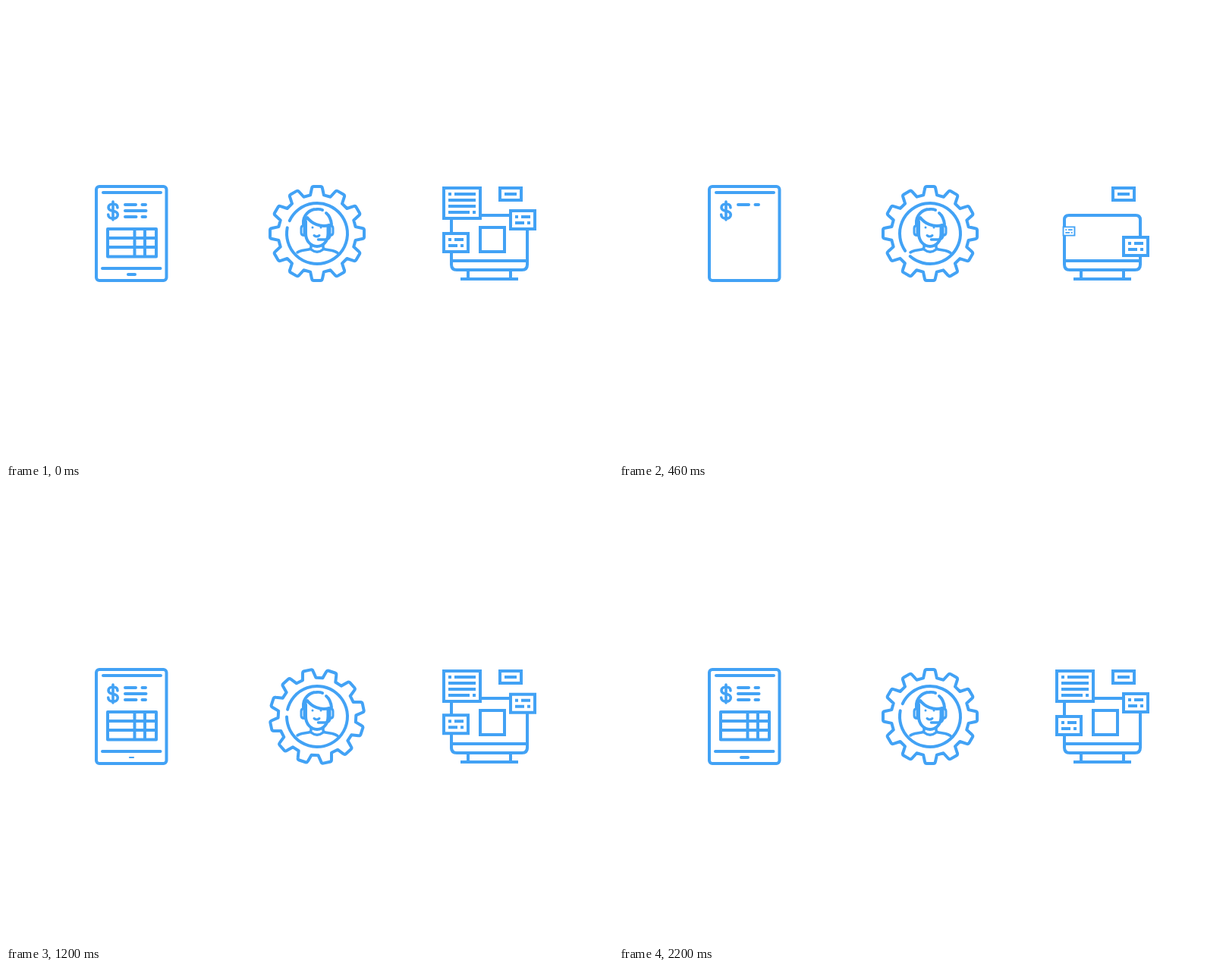
Recreate the animation shown at these times as an HTML page. Size 800 by 600 pixels, loop 2600 ms.

```html
<!DOCTYPE html>
<html lang="en">
<head>
<meta charset="utf-8">
<title>Icons</title>
<style>
  html, body { margin: 0; width: 100%; height: 100%; overflow: hidden; background: #fff; }
  svg { display: block; width: 800px; height: 600px; stroke: #42a2f5; stroke-width: 4; fill: none; }
  .round { stroke-linecap: round; stroke-linejoin: round; }
  .fill { fill: #42a2f5; }
  .card { fill: #fff; }
</style>
</head>
<body>
<svg viewBox="0 0 800 600">
  <g id="tablet" class="round">
    <rect class="fill" x="119" y="238" width="92.5" height="124" rx="4"/>
    <path id="header" d="M128 246H204"/>
    <g id="dollar" stroke-width="3.6">
      <path d="M147 266c0-3.5-2.7-5-6-5s-6 1.7-6 4.7c0 3.2 3 4 6 4.6s6.3 1.4 6.3 5c0 3.2-2.9 5-6.3 5s-6.3-2-6.3-5.3M141 258V282"/>
    </g>
    <path id="row1" d="M157 262H171M179.500 262H184"/>
    <path id="row2" d="M157 270H184.500"/>
    <path id="row3" d="M157 278H171.500M179.500 278H184"/>
    <path id="table"/>
    <path id="footer" d="M127 346H203.500"/>
    <path id="button" d="M161 354H170"/>
  </g>

  <g id="support" class="round">
    <g id="wheel">
      <path id="gear"/>
      <path id="ring" class="fill"/>
    </g>
    <path d="M395 284V300C395 310 402 317 410 317S424.500 310 424.500 300V290"/>
    <path d="M392 287C391 276 400 268 409 268Q414 267.500 417 269M422 273Q428 278 429 288"/>
    <path d="M397 279C403 287 414 292 426 289M397 279Q393 282 392 288"/>
    <path stroke-width="3" d="M393 289.500V302.500Q389 302.500 389 299V293Q389 289.500 393 289.500ZM427 289.500V302.500Q431 302.500 431 299V293Q431 289.500 427 289.500Z"/>
    <path stroke-width="3.500" d="M427 303Q426 308 421 308H411.500"/>
    <path stroke-width="3" d="M406 302.500Q409.500 305.500 413 302.500"/>
    <path id="eyes" stroke-width="3" d="M404 292h.01M415 292h.01"/>
    <path stroke-width="3.500" d="M402 315V318Q402 320.500 399 321L390 322.500Q386 323.500 384 325M418 315V318Q418 320.500 421 321L430 322.500Q434 323.500 437 325.500M402 321Q410 327.500 418 321"/>
  </g>

  <g id="monitor">
    <path class="fill" d="M587 336V282Q587 276 593 276H681Q687 276 687 282V336Z"/>
    <path d="M587 336V341Q587 348 594 348H680Q687 348 687 341V336M609 348V358M665 348V358M599 360H675"/>
    <rect id="square" x="625" y="292" width="32" height="32"/>
    <g id="doc">
      <path class="card" d="M577 240H625V280H577Z"/>
      <path d="M583 248h4m4 0h28M583 256h36M583 264h36M583 272h28m4 0h4"/>
    </g>
    <g id="topCard">
      <path class="card" d="M651 240H679V256H651Z"/>
      <path d="M657 248h16"/>
    </g>
    <g id="rightCard">
      <path class="card" d="M665 270H697V294H665Z"/>
      <path d="M671 278h4m4 0h12M671 286h12m4 0h4"/>
    </g>
    <g id="leftCard">
      <path class="card" d="M577 300H609V324H577Z"/>
      <path d="M583 308h4m4 0h12M583 316h12m4 0h4"/>
    </g>
  </g>
</svg>
<script>
const LOOP = 2600;
const $ = id => document.getElementById(id);
const fills = document.querySelectorAll('.fill');

const linear = (t, start, length) => Math.min(1, Math.max(0, (t - start) / length));
const easeOut = (t, start, length) => 1 - (1 - linear(t, start, length)) ** 2;

function scale(id, x, y, sx, sy = sx, dy = 0) {
  const el = $(id);
  el.style.display = sx > 0 ? '' : 'none';
  el.setAttribute('transform', `translate(${x} ${y + dy}) scale(${sx} ${sy}) translate(${-x} ${-y})`);
}

function drawLine(id, amount) {
  const el = $(id);
  el.style.display = amount > 0 ? '' : 'none';
  el.setAttribute('pathLength', 1);
  el.setAttribute('stroke-dasharray', amount < 1 ? `${amount} 2` : 'none');
}

function gearPath() {
  let d = '';
  for (let i = 0; i < 12; i++) {
    const a = i * Math.PI / 6, c = Math.cos(a), s = Math.sin(a);
    const p = (x, y) => `${(410 + x * c - y * s).toFixed(2)} ${(300 + x * s + y * c).toFixed(2)} `;
    d += (i ? 'L' : 'M') + p(-8.9, -50.6) + 'L' + p(-7, -59.5) + 'Q' + p(-6.6, -62) + p(-4.4, -62) +
      'L' + p(4.4, -62) + 'Q' + p(6.6, -62) + p(7, -59.5) + 'L' + p(8.9, -50.6);
  }
  return d + 'Z';
}

function ringPath() {
  const point = deg => {
    const a = deg * Math.PI / 180;
    return `${410 + 40 * Math.cos(a)} ${300 + 40 * Math.sin(a)}`;
  };
  return `M${point(205)}A40 40 0 1 1 ${point(191)}`;
}

function tablePath(amount) {
  if (!amount) return '';
  const bottom = 294 + 36.5 * amount;
  let d = `M134 294H198V${bottom}H134ZM169.500 294V${bottom}M183 294V${bottom}`;
  for (const y of [306, 318]) if (y < bottom) d += `M134 ${y}H198`;
  return d;
}

function render(t) {
  if (t < 20) t = LOOP - 1;

  const pop = easeOut(t, 0, 180);
  scale('tablet', 165.25, 300, pop);
  scale('support', 410, 300, pop);
  scale('monitor', 637, 318, pop);
  fills.forEach(el => el.setAttribute('fill-opacity', 1 - linear(t, 200, 150)));

  drawLine('header', easeOut(t, 260, 140));
  scale('dollar', 141, 270, easeOut(t, 300, 140));
  drawLine('row1', linear(t, 360, 100));
  drawLine('row2', linear(t, 480, 100));
  drawLine('row3', linear(t, 580, 100));
  $('table').setAttribute('d', tablePath(linear(t, 700, 270)));
  drawLine('footer', linear(t, 1080, 100));
  scale('button', 165.5, 354, linear(t, 1140, 110));

  $('wheel').setAttribute('transform', `rotate(${90 * easeOut(t, 160, 1630) - 90} 410 300)`);
  scale('eyes', 409.5, 292, 1, t >= 2140 && t < 2200 ? 0.25 : 1);

  scale('topCard', 665, 248, easeOut(t, 240, 210));
  scale('rightCard', 681, 282, easeOut(t, 220, 220), undefined, 35 * (1 - easeOut(t, 460, 880)));
  scale('leftCard', 593, 312, easeOut(t, 380, 300), undefined, -15 * (1 - easeOut(t, 470, 1130)));
  scale('doc', 575, 238, easeOut(t, 560, 400));
  scale('square', 641, 308, easeOut(t, 780, 235));
}

$('gear').setAttribute('d', gearPath());
$('ring').setAttribute('d', ringPath());
const begin = performance.now();
function tick() {
  render((performance.now() - begin) % LOOP);
  requestAnimationFrame(tick);
}
tick();
</script>
</body>
</html>
```
